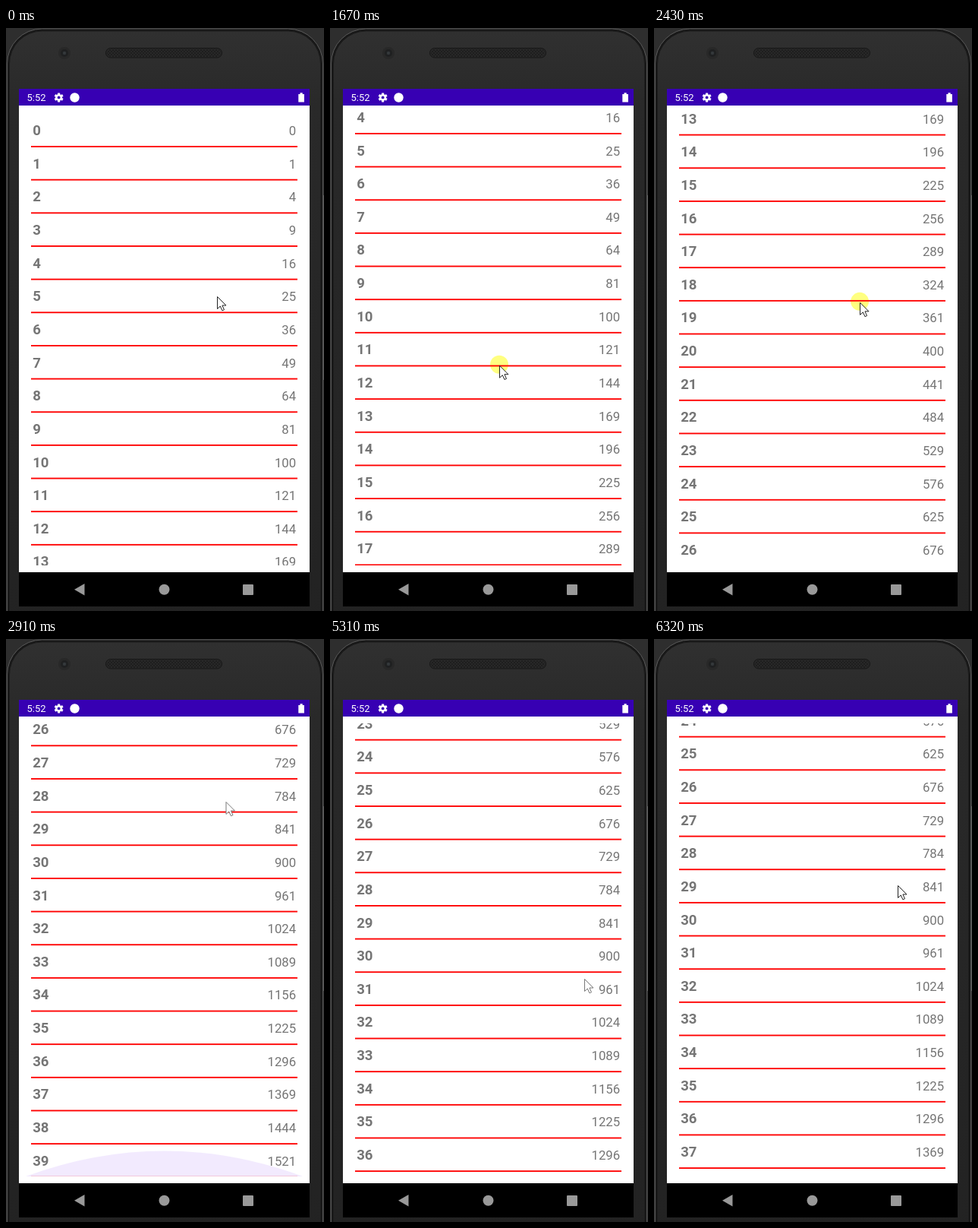
Recreate the animation shown at these times as an HTML page. Size 419 by 767 pixels, loop 7580 ms.

```html
<!DOCTYPE html>
<html lang="en">
<head>
<meta charset="utf-8">
<title>List of squares</title>
<style>
html, body { margin: 0; width: 100%; height: 100%; overflow: hidden; background: #2a2a2a; }
svg { display: block; width: 419px; height: 767px; font-family: Roboto, sans-serif; }
#rows text { fill: #757575; }
.key { font-size: 18.6px; font-weight: 700; }
.value { font-size: 16.8px; text-anchor: end; }
#press { mix-blend-mode: multiply; }
</style>
</head>
<body>
<svg viewBox="0 0 419 767">
  <defs>
    <linearGradient id="body" x2="0" y2="1">
      <stop offset="0" stop-color="#303030"/>
      <stop offset=".12" stop-color="#292929"/>
      <stop offset="1" stop-color="#222"/>
    </linearGradient>
    <pattern id="mesh" width="4" height="4" patternUnits="userSpaceOnUse">
      <circle cx="1" cy="1" r=".8" fill="#111"/>
      <circle cx="3" cy="3" r=".8" fill="#111"/>
    </pattern>
    <clipPath id="view"><rect x="26" y="111" width="365" height="596"/></clipPath>
  </defs>

  <!-- phone -->
  <rect width="419" height="767" fill="#2e2e2e"/>
  <rect x="1.5" y="1" width="416" height="830" rx="46" fill="#181818" stroke="#5a5a5a"/>
  <rect x="4.5" y="4" width="410" height="826" rx="43" fill="url(#body)" stroke="#1b1b1b"/>
  <rect x="418" y="220" width="1" height="243" fill="#555"/>
  <circle cx="77" cy="33" r="8" fill="#282828"/>
  <circle cx="77" cy="33" r="5" fill="#1f2021"/>
  <circle cx="77" cy="33" r="2.2" fill="#34383b"/>
  <rect x="131.5" y="26.5" width="153" height="12.5" rx="6.2" fill="#282828" stroke="#171717"/>
  <rect x="133" y="27.5" width="150" height="10.5" rx="5" fill="url(#mesh)"/>

  <!-- screen -->
  <rect x="17" y="80" width="383" height="681" fill="#fff"/>
  <rect x="17" y="80" width="383" height="22" fill="#3700b3"/>
  <text x="27.5" y="96" font-size="13" fill="#fff">5:52</text>
  <g transform="translate(69.6 91.4)">
    <g id="gear" fill="#fff"></g>
    <circle r="3.2" fill="none" stroke="#fff" stroke-width="2.5"/>
  </g>
  <circle cx="90.5" cy="91.5" r="6.2" fill="#fff"/>
  <path d="M385.3 87h2.200v-1.700h3.200V87h2.200v10.500h-7.600z" fill="#fff"/>

  <g clip-path="url(#view)">
    <g id="rows"></g>
    <path id="glow" d="M26 707Q208.500 640 391 707Z" fill="#6200ee"/>
  </g>

  <rect x="17" y="716" width="383" height="45" fill="#000"/>
  <g fill="#999">
    <path d="M90 738.700L103.500 731V746.500Z"/>
    <circle cx="208.500" cy="738.700" r="7"/>
    <rect x="312" y="732" width="14" height="14" rx="1"/>
  </g>

  <circle id="press" r="12" fill="#ffff80"/>
  <path id="cursor" d="M.5 .5V16.500L4.300 13L6.900 18.800L9.500 17.700L6.900 12H12Z" fill="#fff"/>
</svg>

<script>
const LOOP = 7580, PITCH = 43.65, COUNT = 40;
const $ = id => document.getElementById(id);

// Where the list has scrolled to: [time, offset]
const scroll = [
  [700, 0], [1130, 67.8], [1670, 191.2], [2430, 581.2], [2770, 1150.6],
  [4770, 1150.6], [5310, 1027.3], [5510, 1027.3], [5920, 1075]
];
// Pointer stops: [time, x, y]; DOWN marks the start of a drag to the next stop
const DOWN = true;
const pointer = [
  [140, 278, 353], [270, 275, 349], [490, 275, 349],
  [770, 232, 490, DOWN], [1130, 226, 351],
  [1530, 231, 502, DOWN], [1900, 210, 349],
  [2360, 266, 441, DOWN], [2640, 286, 125],
  [3400, 298, 431], [4080, 298, 431], [4620, 308, 318],
  [4770, 308, 318, DOWN], [5310, 335, 447],
  [5440, 333, 444, DOWN], [5920, 321, 324]
];

const clamp = v => Math.min(1, Math.max(0, v));
const mix = (a, b, u) => a + (b - a) * u;
const smooth = u => u * u * (3 - 2 * u);

// Neighbouring keys around t and the progress between them
function span(keys, t) {
  const i = Math.max(0, keys.findLastIndex(k => k[0] <= t));
  const a = keys[i], b = keys[i + 1] || a;
  return { a, b, u: a === b ? 0 : clamp((t - a[0]) / (b[0] - a[0])) };
}

function add(parent, tag, attrs, text = '') {
  const el = document.createElementNS('http://www.w3.org/2000/svg', tag);
  for (const name in attrs) el.setAttribute(name, attrs[name]);
  el.textContent = text;
  parent.append(el);
}

for (let i = 0; i < COUNT; i++) {
  const y = i * PITCH;
  add($('rows'), 'text', { class: 'key', x: 35.2, y: 141 + y }, i);
  add($('rows'), 'text', { class: 'value', x: 382.2, y: 141 + y }, i * i);
  add($('rows'), 'rect', { x: 33, y: 155.1 + y, width: 351, height: 1.86, fill: '#f00' });
}
for (let a = 0; a < 360; a += 60) {
  add($('gear'), 'rect', { x: -1.6, y: -6, width: 3.2, height: 3, rx: .4, transform: `rotate(${a})` });
}

function draw(t) {
  const list = span(scroll, t);
  $('rows').setAttribute('transform', `translate(0 ${-mix(list.a[1], list.b[1], list.u)})`);

  // The edge lights up when the list hits its end, then fades
  $('glow').setAttribute('opacity', t < 2700 ? 0 : .12 * clamp((3400 - t) / 700));

  const { a, b, u } = span(pointer, t);
  const pressed = a[3] === DOWN;
  const ease = pressed ? u : smooth(u);
  const x = mix(a[1], b[1], ease), y = mix(a[2], b[2], ease);
  const hovering = !pressed && t >= a[0] && a[2] !== b[2];
  $('cursor').setAttribute('transform', `translate(${x} ${y})`);
  $('cursor').setAttribute('stroke', hovering ? '#777' : '#222');
  $('press').setAttribute('transform', `translate(${x} ${y - 1})`);
  $('press').setAttribute('visibility', pressed ? 'visible' : 'hidden');
}

const start = performance.now();
function frame() {
  draw((performance.now() - start) % LOOP);
  requestAnimationFrame(frame);
}
frame();
</script>
</body>
</html>
```
